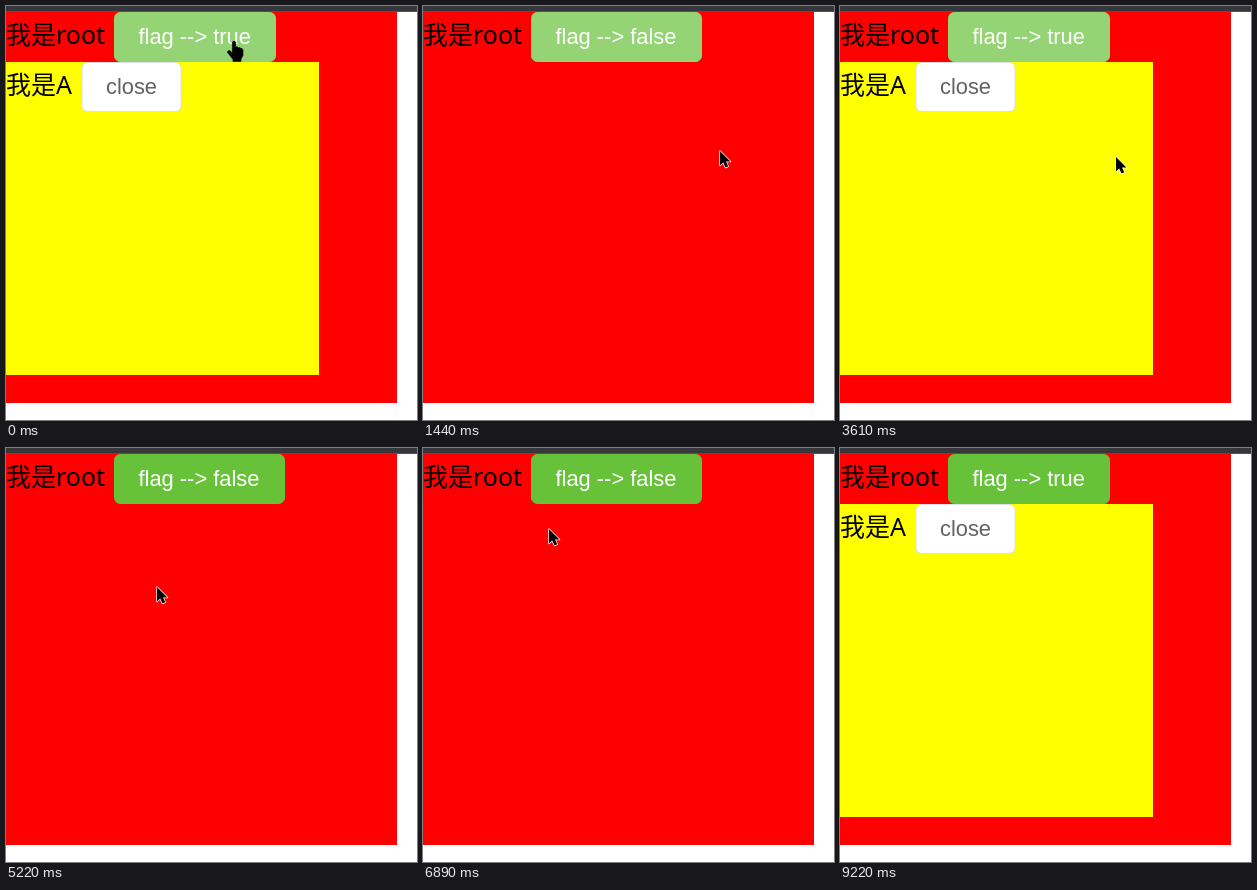
Recreate the animation shown at these times as an HTML page with a canvas. Size 411x414 px, loop 9270 ms.

```html
<!DOCTYPE html>
<html lang="zh">
<head>
<meta charset="utf-8">
<title>flag</title>
<style>
  html, body { margin: 0; width: 100%; height: 100%; overflow: hidden; background: #fff; }
  canvas { display: block; }
</style>
</head>
<body>
<canvas id="stage" width="411" height="414"></canvas>
<script>
const ctx = document.getElementById('stage').getContext('2d');
const LOOP = 9270, STEP = 1000 / 18, FADE = 100;
const LABEL = '25px "Noto Sans", "Noto Sans CJK SC", sans-serif';
const BUTTON = '21.875px "Liberation Sans", Arial, sans-serif';

const BASE = [103, 194, 58], LIGHT = [149, 212, 117], DARK = [82, 155, 46];
const GREY = [96, 98, 102], EDGE = [220, 223, 230], WHITE = [255, 255, 255];
const BLUE = [64, 158, 255], PALE = [236, 245, 255], RIM = [198, 226, 255];

// Pointer hotspot: time, x, y
const path = [
  [0, 228, 35], [440, 228, 35], [610, 224, 37], [900, 255, 105], [1200, 288, 148],
  [1440, 297, 145], [1560, 297, 145], [1720, 324, 118], [1950, 215, 40], [2280, 210, 38],
  [2440, 206, 36], [2670, 206, 36], [2900, 342, 120], [3110, 226, 40], [3170, 222, 38],
  [3390, 222, 38], [3611, 276, 151], [3800, 284, 162], [4170, 150, 92], [4390, 128, 80],
  [4640, 128, 80], [4890, 134, 108], [5060, 134, 108], [5222, 151, 139], [5500, 190, 42],
  [5730, 190, 42], [5940, 212, 158], [6330, 126, 81], [7060, 126, 81], [7350, 168, 170],
  [7700, 87, 300], [8020, 112, 416], [8250, 142, 320], [8540, 213, 38], [8720, 215, 36],
  [8890, 228, 35], [LOOP, 228, 35]
];
const GONE = 9160;

const toggles = [560, 2170, 2600, 3390, 4610, 5670, 6810, 8720];
const rootLooks = [
  [-999, LIGHT], [400, DARK], [560, LIGHT], [2060, DARK], [2170, LIGHT], [2440, DARK],
  [2600, LIGHT], [3250, DARK], [3390, LIGHT], [4500, BASE], [5400, LIGHT], [5550, DARK],
  [5670, LIGHT], [6620, BASE], [8500, LIGHT], [8610, DARK], [8720, LIGHT], [9115, BASE]
];
const plain = [GREY, WHITE, EDGE], hover = [BLUE, PALE, RIM], pressed = [BLUE, PALE, BLUE];
const closeLooks = [
  [-999, plain], [4130, hover], [4500, pressed], [4640, plain], [6180, hover], [6620, pressed], [6840, plain]
];

const rgb = c => `rgb(${c.map(Math.round)})`;
const mix = (a, b, k) => a.map((v, i) => v + (b[i] - v) * k);

// Colour of a look list at time t, faded from the look before
function shade(looks, t, pick = v => v) {
  let i = looks.length - 1;
  while (i > 0 && looks[i][0] > t) i--;
  const now = pick(looks[i][1]);
  if (!i) return now;
  return mix(pick(looks[i - 1][1]), now, Math.min(1, (t - looks[i][0]) / FADE));
}

// Monotone cubic through the path points
function slope(i, axis) {
  const a = path[i], b = path[i + 1];
  return a && b ? (b[axis] - a[axis]) / (b[0] - a[0]) : 0;
}
function tangent(i, axis) {
  const l = slope(i - 1, axis), r = slope(i, axis);
  return l * r > 0 ? 2 * l * r / (l + r) : 0;
}
function along(t, axis) {
  let i = 0;
  while (i < path.length - 2 && path[i + 1][0] <= t) i++;
  const a = path[i], b = path[i + 1], d = b[0] - a[0], u = (t - a[0]) / d, v = 1 - u;
  return a[axis] * (1 + 2 * u) * v * v + b[axis] * (3 - 2 * u) * u * u
    + d * (tangent(i, axis) * u * v * v - tangent(i + 1, axis) * u * u * v);
}

function rect(color, x, y, w, h) {
  ctx.fillStyle = color;
  ctx.fillRect(x, y, w, h);
}
function text(str, x, y, font, color) {
  ctx.font = font;
  ctx.fillStyle = color;
  ctx.fillText(str, x, y);
}
function button(str, x, y, w, ink, fill, edge) {
  ctx.beginPath();
  ctx.roundRect(x + 0.5, y + 0.5, w - 1, 49, 5.75);
  ctx.fillStyle = rgb(fill);
  ctx.fill();
  ctx.strokeStyle = rgb(edge);
  ctx.lineWidth = 1;
  ctx.stroke();
  text(str, x + 24.5, y + 32, BUTTON, rgb(ink));
}

const arrow = new Path2D('M0 0V14.5L3.2 11.6L5.5 16.5L8.2 15.3L6 10.6H10.5Z');
const hand = new Path2D('M-1.6 1Q0 -1 1.6 1V6Q3.4 5 4.4 6.7Q6 6 6.8 7.4Q8.6 7 9 9V14.5L7 18V20.5H-1V18.5L-6.5 11.5Q-6.6 9 -4 9.8L-1.6 12Z');

function pointer(shape, x, y) {
  ctx.save();
  ctx.translate(Math.round(x), Math.round(y));
  ctx.lineJoin = 'round';
  ctx.lineWidth = shape === arrow ? 1.4 : 0.6;
  ctx.strokeStyle = shape === arrow ? '#fff' : '#000';
  ctx.stroke(shape);
  ctx.fillStyle = '#000';
  ctx.fill(shape);
  ctx.restore();
}

function draw(t) {
  const open = toggles.filter(v => v <= t).length % 2 === 0;
  const width = open ? 162 : 171;
  rect('#fff', 0, 0, 411, 414);
  rect('#36373b', 0, 0, 411, 5);
  rect('#505155', 0, 5, 411, 1);
  rect('#f00', 0, 6, 391, 391);
  text('我是root', 0, 38, LABEL, '#000');
  const green = shade(rootLooks, t);
  button('flag --> ' + open, 108, 6, width, WHITE, green, green);
  if (open) {
    rect('#ff0', 0, 56, 313, 313);
    text('我是A', 0, 88, LABEL, '#000');
    button('close', 75.5, 56, 100, ...[0, 1, 2].map(i => shade(closeLooks, t, v => v[i])));
  }
  if (t < GONE) {
    const x = along(t, 1), y = along(t, 2);
    const onRoot = x > 108 && x < 108 + width && y > 6 && y < 56;
    const onClose = open && x > 75 && x < 176 && y >= 56 && y < 106;
    pointer(onRoot || onClose ? hand : arrow, x, y);
  }
}

const start = performance.now();
function tick() {
  const t = (performance.now() - start) % LOOP;
  draw(Math.floor((t + 5) / STEP) * STEP % LOOP);
  requestAnimationFrame(tick);
}
tick();
</script>
</body>
</html>
```
